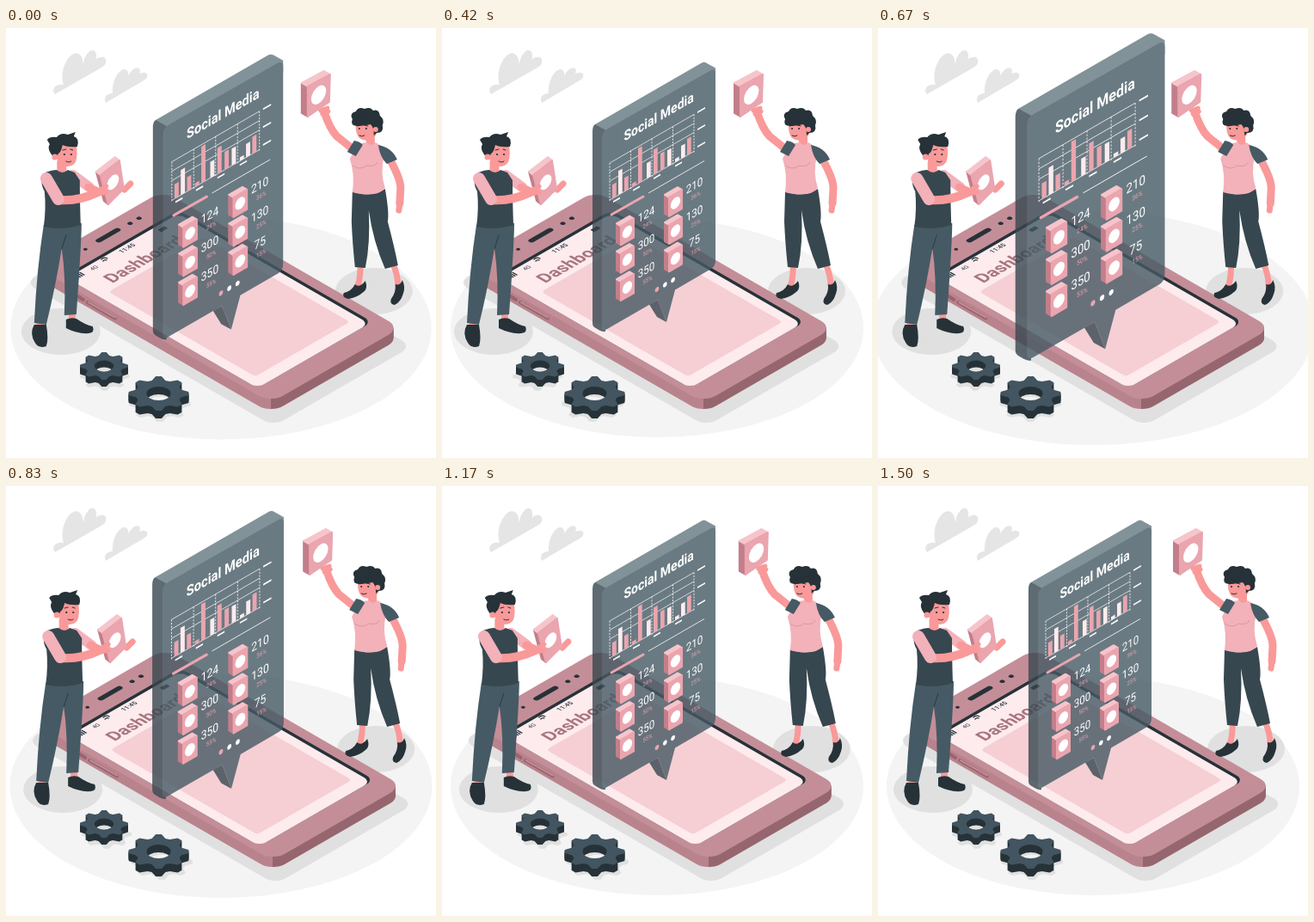
These frames come from a looping animation (500x500 px, 1.54 s). An HTML page:

```html
<!DOCTYPE html>
<html lang="en">
<head>
<meta charset="utf-8">
<title>Social media dashboard</title>
<style>
  html, body { margin: 0; height: 100%; overflow: hidden; background: #fff; }
  svg { display: block; width: 100vw; height: 100vh; }
  text { font-family: Roboto, sans-serif; }
  .skin { fill: #fa9999; }
  .limb { fill: none; stroke: #fa9999; stroke-linecap: round; stroke-linejoin: round; }
  .sleeve { stroke: #f3b1b9; }
  .ink { fill: #263238; }
  .slate { fill: #37474f; }
  .steel { fill: #455a64; }
  .line { fill: none; stroke: #263238; stroke-linecap: round; }
  .shadow { fill: #e0e0e0; }
  .white { fill: #fff; }
</style>
</head>
<body>
<svg viewBox="0 0 500 500">
  <defs>
    <linearGradient id="rim" gradientUnits="userSpaceOnUse" x1="0" y1="0" x2="148" y2="-148">
      <stop offset=".5" stop-color="#b9838d"/>
      <stop offset=".5" stop-color="#96666f"/>
    </linearGradient>
  </defs>
  <ellipse id="floor" cx="250" cy="349" rx="240" ry="127" fill="#f4f4f4"/>
  <g fill="#e5e5e5">
    <path d="M57 77C52 71 58 64 67 66C61 48 75 25 84 30C90 33 89 40 90 42C91 31 100 21 104 28C106 31 105 36 104 37C111 31 118 34 116 40C116 43 113 45 111 46Z"/>
    <path d="M116 87C113 81 117 76 124 76C123 64 129 50 137 48C142 48 143 53 142 56C146 48 153 43 156 49L155 53C161 51 166 52 164 57C164 59 161 60 160 61Z"/>
  </g>

  <g class="shake">
    <g class="shadow">
      <rect width="334" height="186" rx="14" transform="matrix(.866 .5 -.866 .5 183 203)"/>
      <ellipse cx="64" cy="353" rx="46" ry="27"/>
      <ellipse cx="428" cy="306" rx="45" ry="27"/>
      <g id="gearShadows"></g>
    </g>
    <g id="phone"></g>
    <path d="M84 312l6 4M95 319l32 18.500" stroke="#99656f" stroke-width="4" stroke-linecap="round"/>
    <path d="M96 319l31 17.500" stroke="#c48e98" stroke-width="2" stroke-linecap="round"/>
    <g transform="matrix(.866 .5 -.866 .5 180 190.700)">
      <rect class="ink" x="33" y="9" width="260" height="154" rx="10"/>
      <rect x="37" y="13" width="256" height="150" rx="9" fill="#fdebed"/>
      <rect x="81" y="24" width="197" height="127" rx="4" fill="#f5cfd4"/>
      <rect class="ink" x="12" y="70" width="6" height="31" rx="3"/>
      <circle class="ink" cx="16" cy="57" r="2.500"/>
      <circle class="ink" cx="16" cy="45" r="2.500"/>
      <circle class="ink" cx="16" cy="117" r="2"/>
      <rect class="ink" x="42" y="37" width="5" height="9" rx="1"/>
    </g>
    <path class="line" d="M111 269q3-3 7-1M113 271q2-2 4-1" stroke-width="1.300"/>
    <path d="M0 0v-2M2.500 0v-3.500M5 0v-5M7.500 0v-6.500" stroke="#263238" stroke-width="1.500" transform="matrix(.866 -.5 .866 .5 85 291)"/>
    <g class="ink">
      <text transform="matrix(.866 -.5 .866 .5 101 282)" font-size="6.500">4G</text>
      <text transform="matrix(.866 -.5 .866 .5 135 262)" font-size="7.400" font-weight="500">11:45</text>
      <text transform="matrix(.866 -.5 .866 .5 124 297)" font-size="20.300" font-weight="700" fill="#a8757e">Dashboard</text>
    </g>
  </g>

  <g id="panel" opacity=".8">
    <path fill="#647780" d="M178 112L302 40.500Q305 39 308 41L318 46.500V60L186 140Z"/>
    <path class="slate" d="M175 120Q175 114 178 112L190 118.500V353Q187 353.500 183 351.500L178 348.500Q175 347 175 343Z"/>
    <path class="steel" d="M186 128Q186 121 192 117.500L312 49.500Q318 46.500 318 53V270Q318 277 313 280L271 304.500L261 342L251 316L192 350Q186 353.500 186 347Z"/>
    <path class="slate" d="M241 321.500L250 336L261 342L251 316Z"/>
  </g>
  <g id="content"></g>
  <g id="gears"></g>

  <g class="shake">
    <g id="man">
      <path class="limb" stroke-width="8" d="M40 338L39 351M77 329V342"/>
      <path class="steel" d="M44 229L88 227Q88 250 82 333L68 334Q70 290 65 256Q58 300 47 345L33 343Q36 280 44 229Z"/>
      <path class="line" d="M65 257L70 241" stroke-width=".8"/>
      <path class="ink" d="M33 345L47 345Q50 362 47 370Q38 373 34 366Q27 355 33 345ZM70 339Q76 336 82 338Q92 345 101 347Q104 354 96 355Q84 356 70 349Z"/>
      <path class="limb sleeve" stroke-width="12" d="M78 171L97 185"/>
      <path class="limb" stroke-width="9" d="M96 185L107 190"/>
      <path class="limb" stroke-width="11" d="M65 156V167"/>
      <path class="slate" d="M46 168Q54 165 59 165Q66 171 72 165L80 168L86 177Q86 200 87 229Q66 236 44 231Q47 210 45 190Q38 178 46 168Z"/>
      <path class="skin" d="M57 138Q70 132 82 137Q84 148 81 156Q76 163 67 160Q58 156 57 138Z"/>
      <path class="ink" d="M53 147Q48 140 51 135L48 130Q51 126 59 127Q64 121 72 124L81 121L79 126Q86 128 83 138Q72 139 66 136Q64 145 61 146L58 153Z"/>
      <circle class="skin" cx="57" cy="150" r="3.500"/>
      <path class="line" d="M66 142l4-1M75 141l3 1M70 155q4 2 6 0" stroke-width="1"/>
      <path class="line" d="M68 147h.1M76 147h.1" stroke-width="2.200"/>
      <path class="limb" stroke-width="7" d="M138 188L145 181"/>
      <g id="manTile"></g>
      <path class="limb" stroke-width="10" d="M60 200Q84 202 107 191"/>
      <path class="limb" stroke-width="5" d="M106 190L117 184M107 193L117 191"/>
      <path class="limb sleeve" stroke-width="14" d="M47 175L61 199"/>
    </g>
    <g id="woman">
      <path class="limb" stroke-width="7" d="M412 274Q413 288 409 301M449 272Q456 286 456 300"/>
      <path class="ink" d="M406 298Q411 303 418 294Q421 302 417 306Q408 314 398 315Q390 313 393 308Q402 306 406 298ZM453 298Q459 300 461 293Q465 301 462 309Q459 319 452 322Q446 321 448 315Q454 307 453 298Z"/>
      <path class="limb" stroke-width="9" d="M405 142L385 126Q377 118 370 97"/>
      <path class="limb" stroke-width="9" d="M446 152Q459 175 459 186L458 204"/>
      <path class="limb" stroke-width="7" d="M458 204L457 212"/>
      <path class="slate" d="M403 190Q425 198 441 187Q446 215 444 225Q452 255 456 276L441 280Q427 248 422 212Q424 250 418 279L406 278Q403 250 402 225Z"/>
      <path class="limb" stroke-width="10" d="M424 124V134"/>
      <path d="M409 135Q417 133 420 133Q424 139 430 133L436 137L440 148Q435 168 441 186Q432 198 403 191Q406 170 400 152Z" fill="#f3b1b9"/>
      <path fill="none" stroke="#d9909b" stroke-width=".8" d="M403 160Q412 166 419 160Q430 162 432 156"/>
      <path class="steel" d="M397 144L405 131Q412 132 415 136L407 149ZM433 136Q449 139 455 153L443 158Q435 150 433 136Z"/>
      <path class="skin" d="M407 110Q420 102 432 110Q434 122 427 129Q418 133 411 128Q406 122 407 110Z"/>
      <path class="ink" d="M408 114Q400 113 403 106Q399 99 407 97Q410 91 417 94Q424 91 427 96Q434 94 435 102Q441 107 438 113Q440 122 431 122L428 125Q428 115 424 112Q414 114 408 114Z"/>
      <circle class="skin" cx="430" cy="118" r="3"/>
      <path class="line" d="M409 114l3-1M417 113l4 1M411 125q3 2 6 0" stroke-width="1"/>
      <path class="line" d="M411 117h.1M419 117h.1" stroke-width="2"/>
      <g id="womanTile"></g>
      <path class="limb" stroke-width="5" d="M366 96L374 93M368 100L375 97"/>
    </g>
  </g>
</svg>
<script>
const PINK = '#eaa5af', WHITE = '#fff', LOOP = 1540, LEAD = 44;
const $ = id => document.getElementById(id);
const put = (id, markup) => { $(id).innerHTML = markup; };
const range = n => [...Array(n).keys()];

// Upright plane facing the viewer's right
const wall = (x, y) => `transform="matrix(.866 -.5 0 1 ${x} ${y})"`;

const poly = (points, color) =>
  `<polygon points="${points}" fill="${color}" stroke="${color}" stroke-width="2" stroke-linejoin="round"/>`;

// Raised block: a, b, c, d run clockwise from the face's top left; dx, dy point backwards
function block([a, b, c, d], [dx, dy], r) {
  const back = ([x, y]) => [x + dx, y + dy];
  const mid = i => (a[i] + b[i] + c[i] + d[i]) / 4;
  return poly([a, d, back(d), back(a)], '#c27f8b') +
    poly([a, b, back(b), back(a)], '#f6c5cb') +
    poly([a, b, c, d], PINK) +
    `<circle class="white" r="${r}" ${wall(mid(0), mid(1))}/>`;
}

function smallTile(cx, cy) {
  const x = cx - 4.5, y = cy - 4.3;
  return block([[x, y], [x + 15, y - 8.7], [x + 15, y + 13.3], [x, y + 22]], [-5, -2.9], 6.5);
}

function gearPath(x, y, r) {
  const points = range(32).map(i => {
    const angle = (i - 8.5) * Math.PI / 16;
    const radius = i % 4 < 2 ? r : r * .78;
    return [x + radius * Math.cos(angle), y + radius * .577 * Math.sin(angle)].map(n => n.toFixed(1));
  });
  const h = r * .4, v = h * .577;
  return `<path fill-rule="evenodd" d="M${points.join('L')}ZM${x - h} ${y}a${h} ${v} 0 1 0 ${2 * h} 0a${h} ${v} 0 1 0 ${-2 * h} 0Z"/>`;
}

const gear = (x, y, r, depth) =>
  `<g class="ink">${range(depth).map(i => gearPath(x, y + depth - i, r)).join('')}</g>` +
  `<g fill="#425560">${gearPath(x, y, r)}</g>`;

function phoneBody() {
  const slab = (y, color) =>
    `<rect y="-3" width="319" height="174" rx="16" fill="${color}" transform="matrix(.866 .5 -.866 .5 180 ${190.7 + y})"/>`;
  return range(12).map(i => slab(12 - i, 'url(#rim)')).join('') + slab(0, '#c48e98');
}

function chart() {
  const bars = [[3, 16], [10, 28, 1], [17, 16], [26, 4], [33, 41], [43, 18, 1],
    [51, 29], [59, 20], [67, 19, 1], [76, 4, 1], [83, 15, 1], [90, 19]];
  const rules = [0, 10.5, 21, 43].map(y => `M0 ${y}H98`).join('');
  const columns = range(5).map(i => `M${i * 24.5} 0V45`).join('');
  const labels = [4, 27, 51, 76].map(x => `M${x} 47.500h8`).join('') +
    [0, 20, 40].map(y => `M102 ${y}h9`).join('');
  return `<g transform="matrix(1 -.577 0 1 195 157)" fill="none" stroke="#fff">
    <path d="${rules}" stroke-width=".6"/>
    <path d="${columns}" stroke-width=".7" stroke-dasharray="2 1.500"/>
    <path d="${labels}" stroke-width="1.800"/>
    ${bars.map(([x, h, pale]) =>
      `<rect x="${x}" y="${43 - h}" width="4.700" height="${h}" stroke="none" fill="${pale ? '#fdebed' : PINK}"/>`).join('')}
  </g>`;
}

function stat(x, y, count, percent) {
  return smallTile(x - 25, y + 18.3) + `<g text-anchor="middle">
    <text class="white" font-size="13.400" ${wall(x, y + 4.8)}>${count}</text>
    <text fill="${PINK}" font-size="6.800" ${wall(x + 1.5, y + 14.3)}>${percent}%</text></g>`;
}

put('phone', phoneBody());
put('gears', gear(114, 393, 28, 8) + gear(177.5, 425, 35, 9));
put('gearShadows', gearPath(115, 405, 29) + gearPath(179, 437, 36));
put('manTile', block([[110, 171], [132, 154], [137, 187], [119, 205]], [-5, -4], 8));
put('womanTile', block([[351, 68], [377, 54], [376, 86], [351, 103]], [-7, -4], 10));
put('content', `
  <text class="white" font-size="16.200" font-weight="600" ${wall(211.5, 132)}>Social Media</text>
  ${chart()}
  <path d="M197 217L234 196" stroke="${PINK}" stroke-width="3" stroke-linecap="round"/>
  <path d="M240 192L305 154.500" stroke="#fff" stroke-width=".8"/>
  ${stat(237.5, 216.3, 124, 24)}${stat(237.5, 248.6, 300, 50)}${stat(237.5, 281, 350, 55)}
  ${stat(293.5, 182.8, 210, 36)}${stat(293.5, 215, 130, 25)}${stat(293.5, 247.3, 75, 15)}
  ${[[250, 304, PINK], [259.3, 298.5, WHITE], [268.6, 293, WHITE]].map(([x, y, color]) =>
    `<circle r="2.700" fill="${color}" ${wall(x, y)}/>`).join('')}`);

// Keys are spaced a tenth of the loop apart
const SHAKE = [0, -1, 2, -4, 4, -4, 4, -4, 2, -1, 0];
const BEAT = [0, 1, .5, 0, 0, 1, 0, 0, 0, 0, 0];
const smooth = p => (1 - Math.cos(Math.PI * p)) / 2;

function between(keys, at) {
  const i = Math.floor(at);
  return keys[i] + (keys[i + 1] - keys[i]) * smooth(at - i);
}

// The first beat falls over two tenths in one sweep
const beatAt = at => at > 1 && at < 3 ? 1 - smooth((at - 1) / 2) : between(BEAT, at);

function zoom(id, x, y, scale) {
  $(id).setAttribute('transform', `translate(${x} ${y}) scale(${scale}) translate(${-x} ${-y})`);
}

const shaken = document.querySelectorAll('.shake');

function draw(now) {
  const at = (now + LEAD) % LOOP / LOOP * 10;
  const beat = beatAt(at);
  zoom('floor', 250, 349, 1 + .1 * beat);
  zoom('panel', 246, 196.5, 1 + .3 * beat);
  zoom('content', 250.5, 193, 1 + .2 * beat);
  for (const group of shaken) group.setAttribute('transform', `translate(${between(SHAKE, at)} 0)`);
  requestAnimationFrame(draw);
}
draw(0);
</script>
</body>
</html>
```
